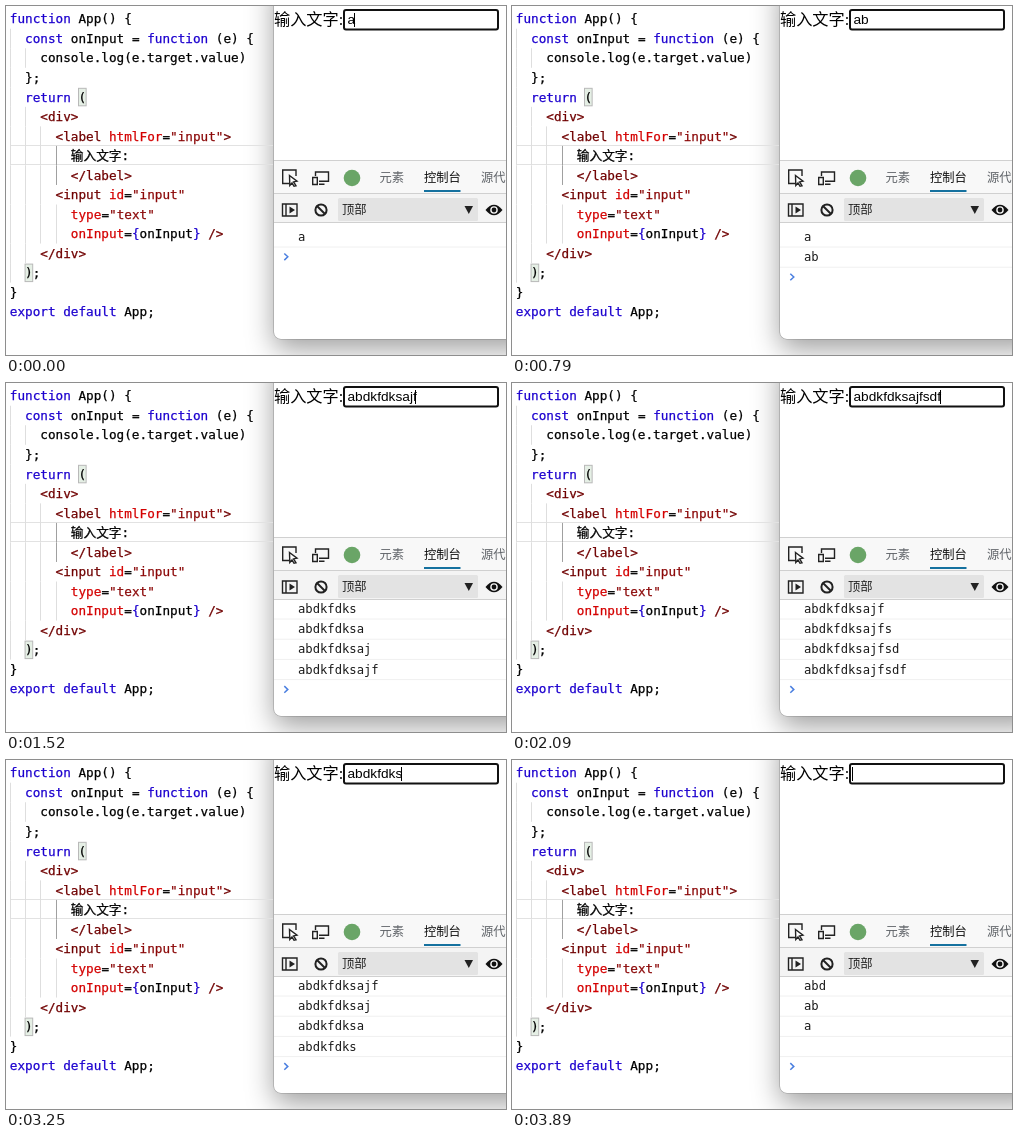
An HTML page that plays this animation: 500x349 px, repeating every 3.99 s.

```html
<!DOCTYPE html>
<html lang="zh">
<head>
<meta charset="utf-8">
<style>
html, body { margin: 0; width: 100%; height: 100%; overflow: hidden; background: #fff; }
#stage { position: relative; width: 500px; height: 349px; overflow: hidden; }
#panel { position: absolute; left: 268px; top: -30px; width: 260px; height: 363px;
  background: #fff; border-radius: 0 0 0 7px;
  box-shadow: 0 0 0 .6px rgba(0,0,0,.25), 0 10px 28px rgba(0,0,0,.38); }
svg { position: absolute; left: 0; top: 0; }
text { white-space: pre; }
.code { font: 12.68px "DejaVu Sans Mono", "Noto Sans CJK SC", "Noto Sans CJK", monospace;
  stroke-width: .25px; }
.log { font: 12.2px "DejaVu Sans Mono", monospace; fill: #1a1a1a; }
.ui { font: 12.3px "Noto Sans CJK SC", "Noto Sans CJK", sans-serif; }
.label { font: 16.2px "Liberation Serif", "Noto Sans CJK SC", "Noto Sans CJK", serif; }
.field { font: 13.7px "Liberation Sans", sans-serif; }
.icon { fill: none; stroke: #222; stroke-width: 1.4; }
</style>
</head>
<body>
<div id="stage">
  <div id="panel"></div>
  <svg width="500" height="349" viewBox="0 0 500 349">
    <defs><clipPath id="console"><path d="M268 217H500V333H268z"/></clipPath></defs>
    <g id="editor"></g>

    <text class="label" x="268" y="18.5">输入文字:</text>
    <rect x="338" y="4" width="154" height="19.5" rx="2" fill="#fff" stroke="#111" stroke-width="2"/>
    <text id="field" class="field" x="341.5" y="18"></text>
    <path id="caret" d="M0 7V21" stroke="#000"/>

    <path d="M268 155H500V187H268z" fill="#f8f8f8"/>
    <path d="M268 187H500V216H268z" fill="#f4f4f4"/>
    <path d="M268 154.5H500M268 187.5H500M268 216.5H500" stroke="#d0d0d0"/>
    <g class="icon">
      <path d="M283 177.5H276.7V164H290V170"/>
      <path d="M283.5 169.5L291 175.2L287.6 175.9L290 179.8L288 180.3L286 177L283.8 179.5z" fill="#fff"/>
      <path d="M309.5 170V166H322.5V175.3H313M313 178.3H318.5"/>
      <path d="M306.7 171.5H311.3V178.5H306.7z"/>
      <path d="M276.5 198H291V210H276.5zM280 198V210"/>
      <path d="M283.5 200.5L289 204L283.5 207.5z" fill="#222" stroke="none"/>
      <circle cx="315" cy="204" r="5.6" stroke-width="2"/>
      <path d="M311 200L319 208" stroke-width="2"/>
    </g>
    <circle cx="346" cy="172" r="8.3" fill="#6aa567"/>
    <g class="ui">
      <text x="373.5" y="175.5" fill="#5f6368">元素</text>
      <text x="418" y="175.5" fill="#111">控制台</text>
      <text x="475" y="175.5" fill="#5f6368">源代码</text>
      <path d="M418 185H454.5" stroke="#15719f" stroke-width="2"/>
      <rect x="332" y="192" width="140" height="23" rx="1.5" fill="#e3e3e3"/>
      <text x="336" y="208" fill="#222">顶部</text>
    </g>
    <path d="M458.5 200H467L462.8 208z" fill="#222"/>
    <path d="M479.5 204Q488 193.5 496.5 204Q488 214.5 479.5 204z" fill="#111"/>
    <circle cx="488" cy="204" r="3.8" fill="#f4f4f4"/>
    <circle cx="488" cy="204" r="2.4" fill="#111"/>

    <g id="log" clip-path="url(#console)"></g>
  </svg>
</div>
<script>
const LOOP = 3990, BLINK = 460;
const $ = id => document.getElementById(id);

function add(parent, tag, attrs, content = '') {
  const el = document.createElementNS('http://www.w3.org/2000/svg', tag);
  for (const key in attrs) el.setAttribute(key, attrs[key]);
  el.textContent = content;
  parent.append(el);
  return el;
}

// Code editor: "~k" and similar marks switch the colour of the text after them.
const COLORS = { k: '#1c00cf', t: '#700000', a: '#d40000', s: '#8c0a0a', p: '#000' };
const CODE = [
  '~kfunction~p App() {',
  '  ~kconst~p onInput = ~kfunction~p (e) {',
  '    console.log(e.target.value)',
  '  };',
  '  ~kreturn~p (',
  '    ~t<div>',
  '      ~t<label ~ahtmlFor~p=~s"input"~t>',
  '        输入文字:',
  '        ~t</label>',
  '      ~t<input ~aid~p=~s"input"',
  '        ~atype~p=~s"text"',
  '        ~aonInput~p=~k{~ponInput~k}~t />',
  '    ~t</div>',
  '  );',
  '}',
  '~kexport default~p App;'
];
const LEFT = 3.8, CHAR = 7.634, TOP = 3.2, LINE = 19.53;

function drawEditor() {
  const editor = $('editor');
  const lineTop = i => TOP + i * LINE;
  add(editor, 'path', { d: 'M4 139.5H267M4 158.5H267', stroke: '#e2e2e2' });
  CODE.forEach((line, i) => {
    const indent = line.search(/\S/);
    for (let col = 0; col < indent; col += 2) {
      const active = col === 6 && (i === 7 || i === 8);
      add(editor, 'path', {
        d: `M${Math.round(LEFT + col * CHAR) + .5} ${lineTop(i)}v${LINE}`,
        stroke: active ? '#a0a0a0' : '#dedede'
      });
    }
  });
  for (const [col, row] of [[9, 4], [2, 13]])
    add(editor, 'rect', {
      x: LEFT + col * CHAR, y: lineTop(row) + 1, width: CHAR, height: 17.5,
      fill: '#e5efe5', stroke: '#b9b9b9'
    });
  CODE.forEach((line, i) => {
    const text = add(editor, 'text', { class: 'code', x: LEFT, y: lineTop(i) + 14.2 });
    ('~p' + line).split('~').slice(1).forEach(part => {
      const color = COLORS[part[0]];
      add(text, 'tspan', { fill: color, stroke: color }, part.slice(1));
    });
  });
}

// Key presses as [time, resulting value].
const FULL = 'abdkfdksajfsdf';
const typed = (time, length) => [time, FULL.slice(0, length)];
const KEYS = [
  typed(0, 1), typed(260, 2),
  ...Array.from({ length: 9 }, (_, i) => typed(880 + i * 80, 3 + i)),
  typed(1620, 12), typed(1720, 13), typed(1800, 14),
  typed(2150, 13),
  ...Array.from({ length: 13 }, (_, i) => typed(2930 + i * 80, 12 - i))
];

const ROW = 20.2;
function drawLog(values) {
  const log = $('log'), n = values.length;
  const first = Math.min(231, 226 - (n - 4) * ROW);
  log.replaceChildren();
  values.forEach((value, i) => {
    const y = first + i * ROW;
    add(log, 'path', { d: `M268 ${y + 10}H500`, stroke: '#f0f0f0' });
    add(log, 'text', { class: 'log', x: 292, y: y + 4 }, value);
  });
  const y = first + n * ROW - .4;
  add(log, 'path', {
    d: `M278.3 ${y - 3.3}l3.5 3.3l-3.5 3.3`, fill: 'none', stroke: '#4a7fe0', 'stroke-width': 1.5
  });
}

let shown = 0;
function render(now) {
  const t = now % LOOP;
  const past = KEYS.filter(key => key[0] <= t);
  const [time, value] = past[past.length - 1];
  if (past.length !== shown) {
    shown = past.length;
    drawLog(past.map(key => key[1]));
    $('field').textContent = value;
    const x = 342 + (value ? $('field').getComputedTextLength() : 0);
    $('caret').setAttribute('transform', `translate(${Math.round(x) - 1.5} 0)`);
  }
  const on = Math.floor((t - time) / BLINK) % 2 === 0;
  $('caret').style.visibility = on ? 'visible' : 'hidden';
}

drawEditor();
const start = performance.now();
function tick() {
  render(performance.now() - start);
  requestAnimationFrame(tick);
}
tick();
</script>
</body>
</html>
```
